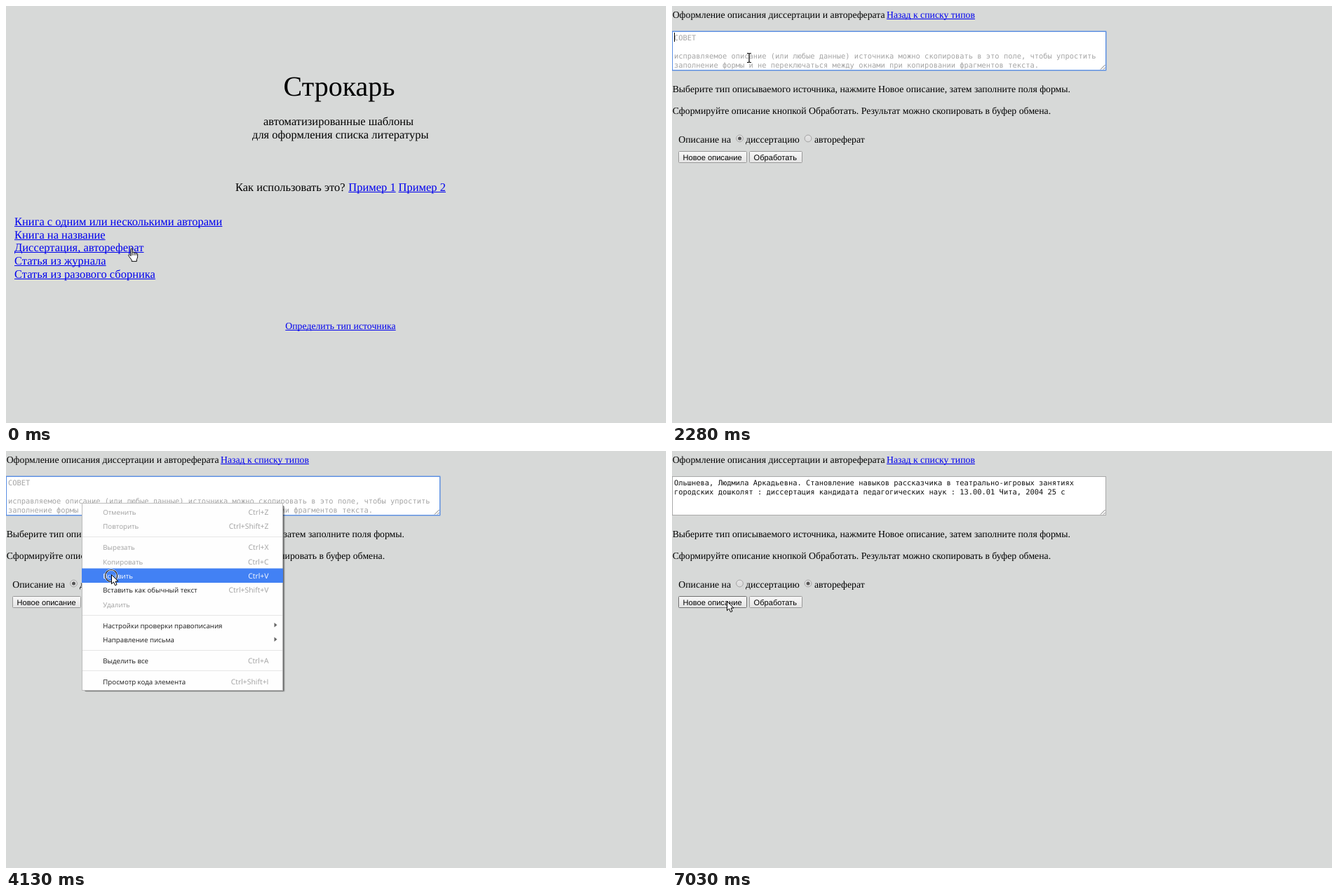
These frames come from a looping animation (941x595 px, 8000 ms). An HTML page:

```html
<!DOCTYPE html>
<html lang="ru">
<head>
<meta charset="utf-8">
<title>Оформление списка литературы</title>
<style>
  html, body { margin: 0; width: 100%; height: 100%; overflow: hidden; background: #d7d9d8; }
  svg { display: block; width: 100%; height: 100%; }
  text { white-space: pre; text-rendering: geometricPrecision; }
  .serif { font-family: "Liberation Serif", "Times New Roman", serif; }
  .sans { font-family: "Liberation Sans", Arial, sans-serif; }
  .mono { font-family: "DejaVu Sans Mono", monospace; }
  .ui { font-family: "Open Sans", "Noto Sans", sans-serif; }
</style>
</head>
<body>
<svg id="stage" viewBox="0 0 941 595" xmlns="http://www.w3.org/2000/svg">
  <defs>
    <linearGradient id="face" x2="0" y2="1">
      <stop offset="0" stop-color="#f8f8f8"/><stop offset="1" stop-color="#e4e4e4"/>
    </linearGradient>
    <linearGradient id="knob" x2="0" y2="1">
      <stop offset="0" stop-color="#e6e6e6"/><stop offset="1" stop-color="#dadada"/>
    </linearGradient>
  </defs>
</svg>
<script>
const LOOP = 8000;
const STEP = 150;
const LINK = '#0000ee';
const LARGE = 16.49;
const SMALL = 13.75;
const svg = document.getElementById('stage');

function add(parent, tag, attrs, content) {
  const el = document.createElementNS('http://www.w3.org/2000/svg', tag);
  for (const key in attrs) el.setAttribute(key, attrs[key]);
  if (content) el.textContent = content;
  return parent.appendChild(el);
}
const group = parent => add(parent, 'g', {});
const rect = (parent, x, y, width, height, more) =>
  add(parent, 'rect', { x, y, width, height, ...more });
const path = (parent, d, more) => add(parent, 'path', { d, ...more });
const text = (parent, font, size, x, y, content, more) =>
  add(parent, 'text', { class: font, 'font-size': size, x, y, ...more }, content);

function link(parent, size, x, y, content) {
  const el = text(parent, 'serif', size, x, y, content, { fill: LINK });
  rect(parent, x, y + 1, el.getComputedTextLength(), 1, { fill: LINK });
}
function show(el, on) {
  el.style.display = on ? '' : 'none';
}

// Start page
const home = group(svg);
text(home, 'serif', 40, 475, 128, 'Строкарь', { 'text-anchor': 'middle' });
text(home, 'serif', LARGE, 367, 170, 'автоматизированные шаблоны');
text(home, 'serif', LARGE, 351, 189, 'для оформления списка литературы');
text(home, 'serif', LARGE, 327, 264, 'Как использовать это?');
link(home, LARGE, 488.3, 264, 'Пример 1');
link(home, LARGE, 559.6, 264, 'Пример 2');
['Книга с одним или несколькими авторами', 'Книга на название', 'Диссертация, автореферат',
  'Статья из журнала', 'Статья из разового сборника'
].forEach((item, i) => link(home, LARGE, 12, Math.round(312.9 + 18.75 * i), item));
link(home, SMALL, 398.3, 461, 'Определить тип источника');

// Form page
const form = group(svg);
const label = (x, y, content) => text(form, 'serif', SMALL, x, y, content);
label(0.7, 17, 'Оформление описания диссертации и автореферата');
link(form, SMALL, 306, 17, 'Назад к списку типов');
label(0.7, 123, 'Выберите тип описываемого источника, нажмите Новое описание, затем заполните поля формы.');
label(0.7, 154, 'Сформируйте описание кнопкой Обработать. Результат можно скопировать в буфер обмена.');
label(9.3, 195, 'Описание на');
label(105, 195, 'диссертацию');
label(203, 195, 'автореферат');

const field = rect(form, 0.5, 36.5, 618, 55, { fill: '#fff' });
path(form, 'M611 90.5L617.5 84M615 90.5L617.5 88', { stroke: '#777', fill: 'none' });
const glow = rect(form, -0.5, 35.5, 620, 57, { fill: 'none', stroke: '#5b8fe3', opacity: 0.45, rx: 1 });

function lines(rows, fill) {
  const g = group(form);
  rows.forEach((row, i) => text(g, 'mono', 10.42, 3, 49 + 12.9 * i, row, { fill }));
  return g;
}
const hint = lines(['СОВЕТ', '',
  'исправляемое описание (или любые данные) источника можно скопировать в это поле, чтобы упростить',
  'заполнение формы и не переключаться между окнами при копировании фрагментов текста.'], '#a5a5a5');
const entry = lines([
  'Ольшнева, Людмила Аркадьевна. Становление навыков рассказчика в театрально-игровых занятиях',
  'городских дошколят : диссертация кандидата педагогических наук : 13.00.01 Чита, 2004 25 с'], '#111');
const caret = rect(form, 3, 38, 1, 13, { fill: '#000' });

function radio(cx) {
  add(form, 'circle', { cx, cy: 189, r: 4.9, fill: 'url(#knob)', stroke: '#a3a3a3' });
  return add(form, 'circle', { cx, cy: 189, r: 2.5, fill: '#555' });
}
const thesis = radio(96.5);
const abstract = radio(194);

function button(x, width, content) {
  const box = rect(form, x + 0.5, 207.5, width - 1, 16, { rx: 1, fill: 'url(#face)', stroke: '#999' });
  text(form, 'sans', 11.1, x + 6.6, 219.5, content);
  return box;
}
const create = button(9, 98, 'Новое описание');
button(110, 76, 'Обработать');

// Context menu
const menu = group(svg);
rect(menu, 113, 79, 285, 265, { opacity: 0.12, rx: 2 });
rect(menu, 112, 78, 284.5, 264.7, { opacity: 0.45, rx: 1 });
rect(menu, 108.5, 74.5, 286, 267, { fill: '#fefefe', stroke: '#bcbcbc' });
const bar = rect(menu, 108, 167.5, 287, 20.5, { fill: '#4281f4' });
[122, 234, 284, 313.5].forEach(y => rect(menu, 109, Math.floor(y), 285, 1, { fill: '#e6e6e6' }));
const GREY = '#a0a0a0';
const INK = '#1c1c1c';
const items = [
  [87, 'Отменить', 'Ctrl+Z', GREY],
  [107.5, 'Повторить', 'Ctrl+Shift+Z', GREY],
  [137.5, 'Вырезать', 'Ctrl+X', GREY],
  [158, 'Копировать', 'Ctrl+C', GREY],
  [178, 'Вставить', 'Ctrl+V', INK],
  [198.5, 'Вставить как обычный текст', 'Ctrl+Shift+V', INK],
  [219, 'Удалить', '', GREY],
  [249, 'Настройки проверки правописания', '>', INK],
  [269.5, 'Направление письма', '>', INK],
  [299.5, 'Выделить все', 'Ctrl+A', INK],
  [329.5, 'Просмотр кода элемента', 'Ctrl+Shift+I', INK]
].map(([y, name, keys, fill]) => {
  const title = text(menu, 'ui', 9.7, 138.3, y + 3.5, name, { fill });
  if (keys === '>') path(menu, `M382.5 ${y - 4}l4 3.2l-4 3.2z`, { fill: '#666' });
  const combo = text(menu, 'ui', 10.4, 374.5, y + 3.5, keys === '>' ? '' : keys,
    { fill: GREY, 'text-anchor': 'end' });
  return { title, combo };
});
const paste = items[4];

// Click ring and pointers, drawn around their hot spots
const ring = group(svg);
add(ring, 'circle', { r: 8.5, fill: 'none', stroke: '#fff', 'stroke-width': 2.4 });
add(ring, 'circle', { r: 8.5, fill: 'none', stroke: '#111', 'stroke-width': 1.2 });

const pointers = { hand: group(svg), arrow: group(svg), beam: group(svg) };
const outline = { fill: '#fff', stroke: '#000', 'stroke-linejoin': 'round' };
path(pointers.hand, 'M-1 1C-1-.3 1.2-.3 1.2 1V5.8C2 5 3.7 5.3 3.8 6.3C4.6 5.6 6.2 6 6.3 7' +
  'C7 6.4 8.6 6.8 8.6 8V11.5C8.6 14 7.3 15 7.3 16V18.3H.2V16.5C-.8 15-3.2 12-4.2 10.3' +
  'C-4.8 9-3.4 8.2-2.4 9.2L-1 10.6Z', outline);
path(pointers.hand, 'M1.2 5.8V9.8M3.8 6.3V9.8M6.3 7V9.8', { stroke: '#000', 'stroke-width': 0.9 });
path(pointers.arrow, 'M.5.6V13.7L3.5 10.9L5.5 15.7L8 14.7L6 10H10Z', outline);
path(pointers.beam, 'M-3-6.5H-1L0-5.8L1-6.5H3M0-6V6M-3 6.5H-1L0 5.8L1 6.5H3',
  { fill: 'none', stroke: '#000', 'stroke-width': 1.2 });

const moves = [
  { at: 1230, steps: 5, to: [110, 74] },
  { at: 3210, steps: 5, to: [150, 176] },
  { at: 5210, steps: 7, to: [190, 185] },
  { at: 6570, steps: 4, to: [78, 214] }
];
const smooth = p => p * p * (3 - 2 * p);

// The pointer was sampled, so it advances in hard steps.
function pointerAt(ms) {
  let [x, y] = [179, 346];
  for (const { at, steps, to } of moves) {
    if (ms < at) break;
    const p = smooth(Math.min(Math.floor((ms - at) / STEP) + 1, steps) / steps);
    x += (to[0] - x) * p;
    y += (to[1] - y) * p;
  }
  return [x, y];
}

const within = (ms, ...spans) => spans.some(([a, b]) => ms >= a && ms < b);

function draw(ms) {
  const [x, y] = pointerAt(ms);
  const pasted = ms >= 4280;
  const menuOpen = within(ms, [2750, 4280]);
  const focused = within(ms, [2140, 6260]);
  const checked = ms >= 6260;

  show(home, ms < 770);
  show(form, ms >= 770);
  show(menu, menuOpen);
  show(hint, !pasted);
  show(entry, pasted);
  show(glow, focused);
  field.setAttribute('stroke', focused ? '#5b8fe3' : '#a9a9a9');
  show(thesis, !checked);
  show(abstract, checked);

  show(caret, within(ms, [2140, 2750], [3210, 3680], [4280, 4900], [5360, 5810]));
  caret.setAttribute('x', pasted ? 561 : 3);
  caret.setAttribute('y', pasted ? 51 : 38);

  const hot = menuOpen && y > 167.5 && y < 188;
  show(bar, hot);
  paste.title.setAttribute('fill', hot ? '#fff' : INK);
  paste.combo.setAttribute('fill', hot ? '#fff' : GREY);

  const over = checked && x < 107 && y > 207;
  create.setAttribute('stroke', over ? '#707070' : '#999');

  show(ring, within(ms, [2140, 2280], [4130, 4280], [6110, 6260]));
  ring.setAttribute('transform', `translate(${x} ${y + 2})`);

  const kind = ms < 1230 ? 'hand' : ms < 3210 && y < 92 ? 'beam' : 'arrow';
  for (const name in pointers) show(pointers[name], name === kind);
  pointers[kind].setAttribute('transform', `translate(${x} ${y})`);
}

function tick() {
  draw(performance.now() % LOOP);
  requestAnimationFrame(tick);
}
tick();
</script>
</body>
</html>
```
